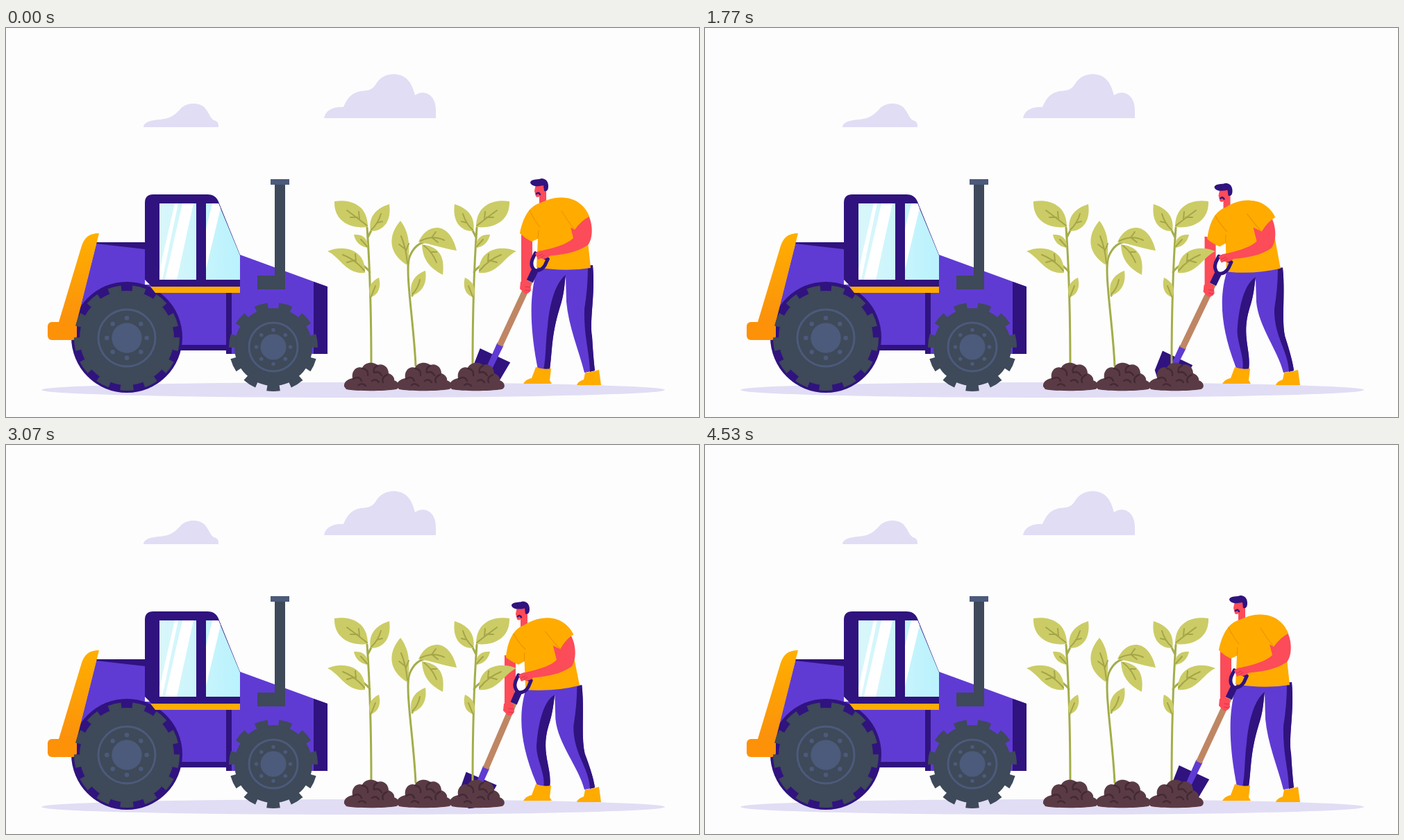
Animation of 998 by 561 pixels, one loop 5010 ms. Source, as an HTML page:

```html
<!DOCTYPE html>
<html>
<head>
<meta charset="utf-8">
<style>
html, body { margin: 0; width: 100%; height: 100%; overflow: hidden; background: #fdfdfd }
svg { display: block; width: 100vw; height: 100vh }
.purple { fill: #5f3bd3 } .dark { fill: #30137e } .yellow { fill: #ffab00 } .skin { fill: #fc4b59 }
.pale { fill: #e1ddf5 } .slate { fill: #3e4959 } .steel { fill: #4c5a7b } .leaf { fill: #cbcc66 }
.line { fill: none; stroke-linecap: round; stroke-linejoin: round }
.stem { stroke: #a3ad49; stroke-width: 3 } .vein { stroke: #a4a548; stroke-width: 2 }
.crease { stroke: #ed8d00; stroke-width: 1 }
</style>
</head>
<body>
<svg viewBox="0 0 998 561">
  <defs>
    <linearGradient id="glass"><stop stop-color="#d9f7fa"/><stop offset="1" stop-color="#b9f2fd"/></linearGradient>
    <linearGradient id="bumper" x2="0" y2="1"><stop stop-color="#ffaf00"/><stop offset="1" stop-color="#fb900c"/></linearGradient>
    <g id="plant">
      <path class="line stem" d="M526 487C526 410 524 345 520 288M524 352C522 349 519 346 515 343M521 302Q524 296 528 288M525 388L530 376M521 316L514 307"/>
      <path class="leaf" d="M521 287C495 290 472 278 473 250C495 247 521 254 521 287ZM525 293C521 270 536 259 552 254C555 275 547 293 525 293ZM521 317C506 315 502 303 501 298C514 297 522 304 521 317ZM463 322C485 312 518 318 517 353C490 356 481 330 463 322ZM525 388C519 372 529 364 537 360C541 375 535 386 525 388Z"/>
      <path class="line vein" d="M520 285Q506 274 491 263M509 275L508 265M506 273L496 273M526 291Q536 282 540 268M534 281L542 279M520 315L511 305M516 350Q503 334 485 327M504 336L503 326M502 335L491 338M526 387L532 372"/>
    </g>
    <g id="soil">
      <path fill="#5a3b45" d="M487 517C486 510 493 506 499 505C497 495 505 487 513 490C517 481 530 481 535 486C545 483 551 491 551 498C557 500 560 505 559 508C567 511 568 519 562 521C545 524 504 524 490 521Z"/>
      <path class="line" stroke="#432a35" stroke-width="2.5" d="M500 506Q509 501 512 509M513 491Q522 492 521 501M535 487Q528 490 530 497Q537 494 541 501M549 500Q540 504 543 511M527 509Q533 505 537 511M508 515Q513 511 518 516"/>
    </g>
  </defs>

  <path class="pale" d="M198 143C198 136 208 133 221 132C238 131 244 124 250 118C259 106 280 107 287 116C294 124 294 132 302 134C306 136 306 139 306 143ZM458 130C460 119 470 113 486 114C491 102 497 93 511 91C522 90 526 90 532 82C540 67 556 64 568 68C582 73 586 86 589 97C601 88 619 95 619 118V130Z"/>
  <ellipse class="pale" cx="500" cy="522" rx="449" ry="11"/>

  <path class="dark" d="M130 309H205V322H130Z"/>
  <path class="purple" d="M130 311L200 319V370H337V327L463 373V470H317V460H250L100 430Z"/>
  <path class="dark" d="M443 366L463 373V470H443ZM317 382H325V470H317ZM246 457H320V465H246Z"/>
  <circle class="dark" cx="174" cy="446" r="80"/>
  <path fill="url(#bumper)" d="M134 296L101 428L76 424L109 314C113 302 120 296 134 296Z"/>
  <rect fill="#fd9209" x="60" y="424" width="42" height="26" rx="6"/>
  <path class="dark" d="M200 252Q200 240 212 240H290Q303 240 307 253L337 327V374H211L200 363Z"/>
  <path fill="url(#glass)" d="M221 253H274V363H221ZM288 253H306L337 328V363H288Z"/>
  <path fill="#fff" d="M254 253H270L246 363H229ZM243 253H248L225 363H221V350ZM297 253H306L309 260L288 348V290Z"/>
  <path class="yellow" d="M208 373H337V382H215Z"/>
  <path class="slate" d="M387 226H402V377H362V357H387Z"/>
  <path class="steel" d="M381 218H408V226H381Z"/>
  <g id="wheels"></g>

  <g id="man">
    <g id="head">
      <path class="skin" d="M763 225L761 235L763 243Q766 245 768 243V255L778 250V226Z"/>
      <path class="dark" d="M755 223C756 217 768 219 771 217C778 217 781 222 781 228C781 234 779 236 775 235L774 227C766 229 757 229 755 223Z"/>
      <path class="line" stroke="#30137e" stroke-width="2.5" d="M764 239Q767 236 769 240"/>
    </g>
    <path id="legs" class="purple"/>
    <path id="shade" class="dark"/>
    <path class="yellow" d="M763 489Q774 493 785 491L783 508L786 513H745Q748 507 757 505ZM834 497Q845 496 854 493L857 515H822Q823 510 832 507Z"/>
    <path class="skin arm" d="M742 296L758 300L758 328Q757 352 754 372H742Z"/>
    <g class="torso">
      <path class="yellow" d="M770 252C782 246 794 243 806 245L836 290L842 346Q805 352 764 345L766 304L757 308Q747 303 740 296C744 276 752 257 770 252Z"/>
      <path class="line crease" d="M754 263Q761 278 769 287M766 303L767 292"/>
    </g>
    <path class="skin arm" d="M810 275L836 265C847 282 845 305 838 313C820 325 800 327 778 329L768 322C790 317 808 312 817 303Z"/>
    <g class="torso">
      <path class="yellow" d="M798 245C822 243 836 260 840 272Q829 277 819 291L800 280Z"/>
      <path class="line crease" d="M800 264Q810 280 819 291"/>
    </g>
    <g id="shovel">
      <path class="dark" d="M-24 148H24L21 178Q10 190 0 195Q-12 190 -22 178Z"/>
      <path class="purple" d="M-5 130H5L4 176Q0 182 -4 176Z"/>
      <path fill="#bf8664" d="M-4.5 28H4.5V132H-4.5Z"/>
      <path class="dark" d="M-5 10H5V30H-5Z"/>
      <path class="line" stroke="#30137e" stroke-width="5" d="M-10 -10V0Q-9 10 0 13Q9 10 10 0V-10Z"/>
    </g>
    <g class="arm">
      <path class="skin" d="M762 325Q769 319 780 322L783 329Q775 335 771 332L766 334Z"/>
      <path class="skin" d="M741 366Q750 362 755 367L756 378Q753 384 747 383L740 376Z"/>
      <path class="line" stroke="#d93250" stroke-width="1" d="M766 329L772 326M770 331L775 328M748 373L755 374M748 378L754 379"/>
    </g>
  </g>

  <use href="#plant"/>
  <use href="#plant" transform="translate(1198) scale(-1 1)"/>
  <path class="line stem" d="M590 487C587 420 573 345 582 328Q590 310 606 308M585 386L590 376M579 350V335"/>
  <path class="leaf" d="M578 342C551 326 549 300 568 278C584 298 581 325 578 342ZM594 309C604 283 638 275 649 321C630 318 612 311 594 309ZM599 312C621 315 633 326 629 356C610 346 600 334 599 312ZM584 386C580 365 591 355 604 350C607 370 598 382 584 386Z"/>
  <path class="line vein" d="M578 339Q576 317 569 300M576 321L580 311M575 319L566 312M597 307Q615 298 631 306M614 301L619 294M613 302L622 309M602 314Q614 323 620 338M613 323L620 323M585 384Q594 375 596 363"/>
  <use href="#soil"/><use href="#soil" x="76"/><use href="#soil" x="152"/>
</svg>
<script>
const LOOP = 5010;
const $ = id => document.getElementById(id);

function wheel(x, y, r, teeth, hub) {
  let bolts = '';
  for (let i = 0; i < 8; i++) {
    const a = i * Math.PI / 4;
    bolts += `<circle class="steel" cx="${hub * .7 * Math.cos(a)}" cy="${hub * .7 * Math.sin(a)}" r="${hub * .08}"/>`;
  }
  return `<g transform="translate(${x} ${y})"><circle class="slate" r="${r - 8}"/>
    <circle fill="none" stroke="#3e4959" stroke-width="10" r="${r - 5}" pathLength="${2 * teeth}"
      stroke-dasharray="1.08 .92" transform="rotate(${90 - 97 / teeth})"/>
    <circle fill="none" stroke="#4c5a7b" stroke-width="3" r="${hub}"/>
    <circle class="steel" r="${hub * .53}"/>${bolts}</g>`;
}
$('wheels').innerHTML = wheel(174, 447, 76, 13, 41) + wheel(385, 460, 64, 11, 35);

// time, head x, stoop, grip x, grip y, shovel tilt
const keys = [
  [570, 0, 0, 0, 0, 0],
  [770, -3.5, .13, -4, 2, -1],
  [1330, -31, 1, -28, 8, -1.8],
  [1480, -34, 1.1, -31, 9, -1],
  [2130, -5, .22, -10, -1, 2],
  [2420, 0, .04, -1, 0, 0],
  [3070, -27, .87, -24, 7, -1.8],
  [3280, -34, 1.1, -31, 9, -1],
  [3930, -5.5, .27, -11, -1, 2.5],
  [4250, 0, .05, -2, 0, .5],
  [4530, 0, 0, 0, 0, 0]
];

function slope(i, c) {
  const a = keys[i - 1], b = keys[i + 1];
  return a && b ? (b[c] - a[c]) / (b[0] - a[0]) : 0;
}

// Smooth curve through the keys (cubic Hermite)
function pose(t) {
  const i = keys.findIndex(k => k[0] > t) - 1;
  if (i < 0) return [0, 0, 0, 0, 0];
  const a = keys[i], b = keys[i + 1], d = b[0] - a[0], u = (t - a[0]) / d, v = 1 - u;
  return [1, 2, 3, 4, 5].map(c =>
    v * v * (1 + 2 * u) * a[c] + u * u * (3 - 2 * u) * b[c] +
    d * u * v * (v * slope(i, c) - u * slope(i + 1, c)));
}

function bend(p) {
  const x = n => n - 18 * p, y = n => n + 5 * p;
  const inner = `783 493C787 465 ${x(785)} 445 ${x(797)} 405C${x(804)} 384 ${x(804)} 372 ${x(806)} ${y(356)}`;
  const outer = `${x(845)} ${y(342)}C${x(849)} 385 ${x(840) + 4 * p} 420 ${x(844) + 6 * p} 445Q846 478 848 494`;
  $('legs').setAttribute('d',
    `M${x(766)} ${y(343)}C${x(753)} 385 ${x(754)} 430 766 493L${inner}Z
     M${x(766)} ${y(343)}L${outer}L833 497C825 465 ${x(810)} 430 ${x(807)} 395L${x(806)} ${y(356)}Z`);
  $('shade').setAttribute('d',
    `M774 493C778 475 ${x(777)} 450 ${x(780)} 430C${x(783)} 395 ${x(792)} 367 ${x(806)} ${y(356)}
     C${x(804)} 372 ${x(804)} 384 ${x(797)} 405C${x(785)} 445 787 465 783 493Z
     M${x(838)} ${y(344)}L${outer}L841 496C840 465 ${x(832)} 445 ${x(833)} 405Q${x(838)} 375 ${x(838)} ${y(344)}Z`);
}

const place = (el, value) => el.setAttribute('transform', value);
const torsos = document.querySelectorAll('.torso'), arms = document.querySelectorAll('.arm');

function draw(now) {
  const [head, stoop, gx, gy, tilt] = pose(now % LOOP);
  place($('head'), `translate(${head} ${-.31 * head})`);
  torsos.forEach(el => place(el, `translate(${-18 * stoop} ${5 * stoop}) rotate(${-6 * stoop} 803 347)`));
  arms.forEach(el => place(el, `translate(${gx} ${gy})`));
  place($('shovel'), `translate(${767 + gx} ${338 + gy}) rotate(${25 + tilt})`);
  bend(stoop);
  requestAnimationFrame(draw);
}
requestAnimationFrame(draw);
</script>
</body>
</html>
```
